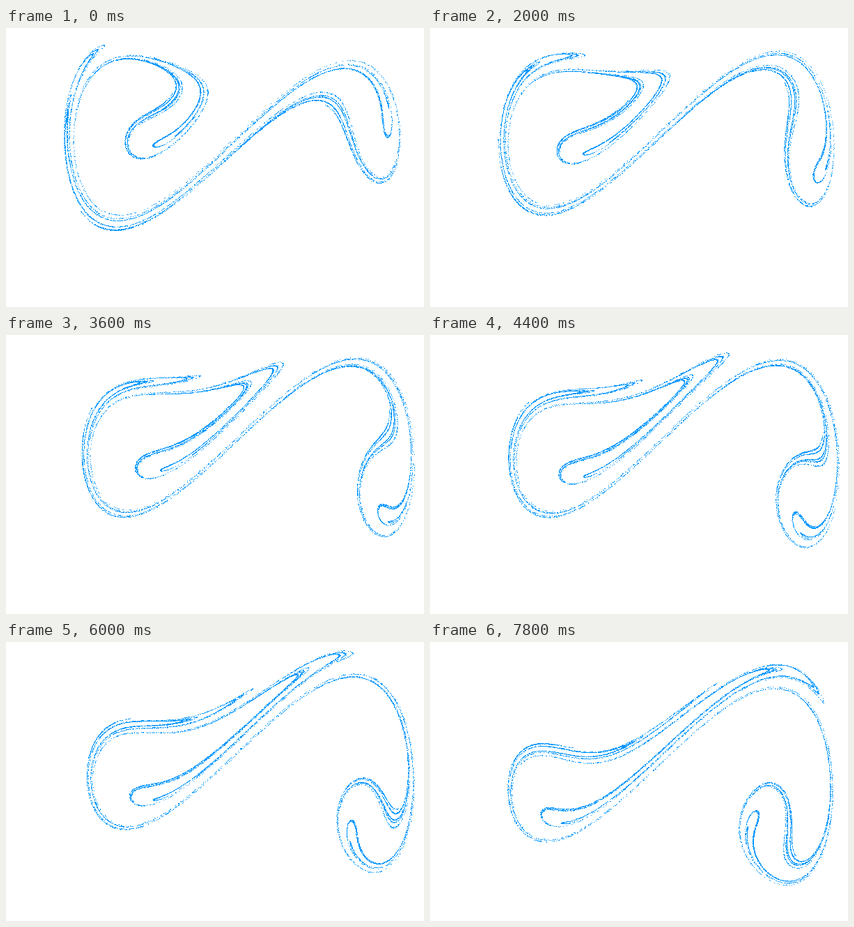
Recreate the animation shown at these times as an HTML page with a canvas. Size 600 by 400 pixels, loop 8000 ms.

```html
<!DOCTYPE html>
<html lang="en">
<head>
<meta charset="utf-8">
<title>Forced oscillator section</title>
<style>
  html, body { margin: 0; width: 100%; height: 100%; overflow: hidden; background: #fff; }
  canvas { display: block; width: 600px; height: 400px; }
</style>
</head>
<body>
<canvas id="stage" width="600" height="400"></canvas>
<script>
  // Poincaré section of x'' + DAMPING x' - x + x^3 = FORCE cos t, shown at advancing phase.
  const DAMPING = 0.2, FORCE = 0.3;
  const STEPS = 120, STEP = 2 * Math.PI / STEPS;
  const FRAMES = 40, FRAME_MS = 200, POINTS = 10000, TRANSIENT = 60;
  const CENTER_X = 321.6, CENTER_Y = 191.4, SCALE_X = 177, SCALE_Y = 186.5;

  const accel = (x, v, t) => x - x * x * x - DAMPING * v + FORCE * Math.cos(t);

  // Fourth-order Runge-Kutta step.
  function advance([x, v], t) {
    const h = STEP / 2;
    const a1 = accel(x, v, t);
    const v2 = v + h * a1, a2 = accel(x + h * v, v2, t + h);
    const v3 = v + h * a2, a3 = accel(x + h * v2, v3, t + h);
    const v4 = v + STEP * a3, a4 = accel(x + STEP * v3, v4, t + STEP);
    return [
      x + STEP / 6 * (v + 2 * v2 + 2 * v3 + v4),
      v + STEP / 6 * (a1 + 2 * a2 + 2 * a3 + a4)
    ];
  }

  // One long orbit; each period contributes one dot to every frame.
  function sampleOrbit() {
    const frames = Array.from({ length: FRAMES }, () => []);
    let state = [0.1, 0.1];
    for (let period = -TRANSIENT; period < POINTS; period++) {
      for (let n = 0; n < STEPS; n++) {
        if (period >= 0 && n < FRAMES) frames[n].push(state);
        state = advance(state, n * STEP);
      }
    }
    return frames;
  }

  const frames = sampleOrbit();
  const ctx = document.getElementById("stage").getContext("2d");
  let shown = -1;

  function draw(index) {
    ctx.fillStyle = "#fff";
    ctx.fillRect(0, 0, 600, 400);
    ctx.fillStyle = "#0096ff";
    for (const [x, v] of frames[index]) {
      ctx.fillRect(Math.round(CENTER_X + SCALE_X * x), Math.round(CENTER_Y - SCALE_Y * v), 1, 1);
    }
  }

  function tick() {
    const index = Math.floor(performance.now() / FRAME_MS) % FRAMES;
    if (index !== shown) draw(shown = index);
    requestAnimationFrame(tick);
  }
  tick();
</script>
</body>
</html>
```
